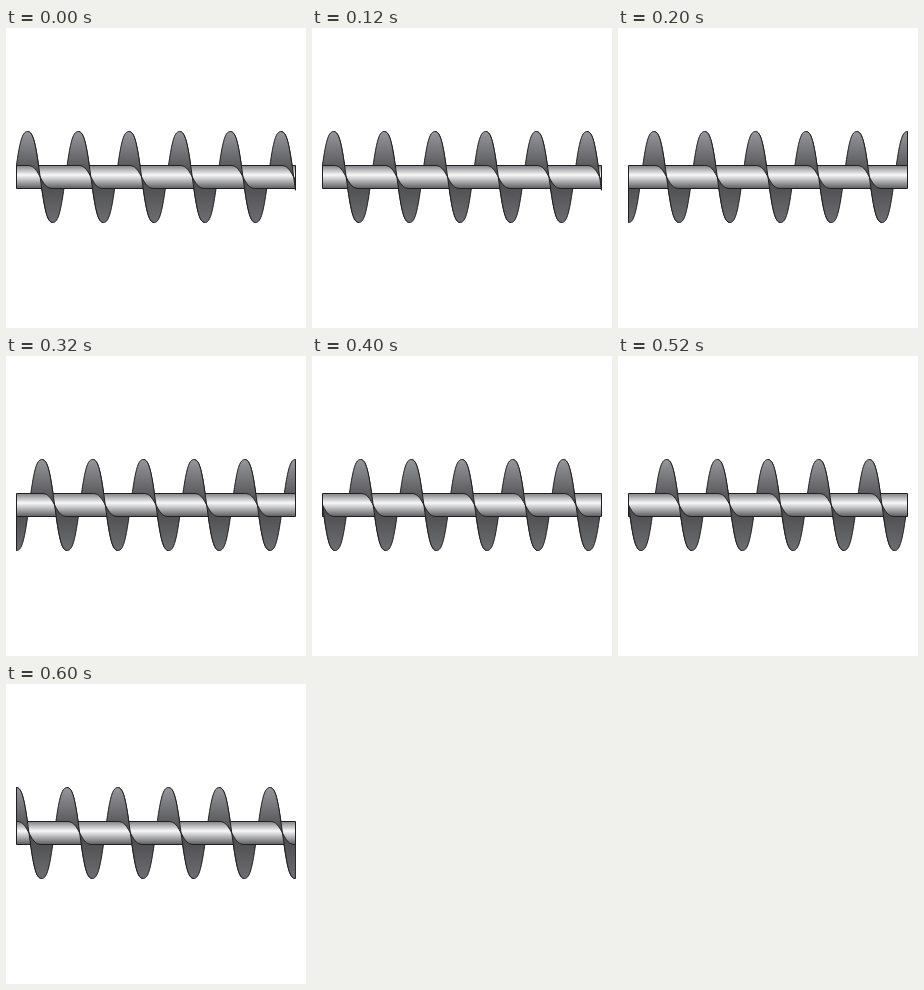
Animation of 300x300 px, one loop 800 ms. Source, as an HTML page:

```html
<!DOCTYPE html>
<html lang="en">
<head>
<meta charset="utf-8">
<title>Rotating screw</title>
<style>
  html, body { margin: 0; width: 100%; height: 100%; overflow: hidden; background: #fff; }
  svg { display: block; width: 100%; height: 100%; }
  .line { stroke: #231f20; stroke-width: 1; stroke-linejoin: round; }
  .blade { fill: url(#bladeTone); }
</style>
</head>
<body>
<svg viewBox="0 0 300 300">
  <defs>
    <linearGradient id="bladeTone" gradientUnits="userSpaceOnUse" x1="0" y1="103" x2="0" y2="195">
      <stop offset="0" stop-color="#97989c"/>
      <stop offset=".5" stop-color="#48484a"/>
      <stop offset="1" stop-color="#6d6e71"/>
    </linearGradient>
    <linearGradient id="shaftTone" x1="0" y1="0" x2="0" y2="1">
      <stop offset="0" stop-color="#808185"/>
      <stop offset=".41" stop-color="#f8f8f9"/>
      <stop offset="1" stop-color="#5c5d60"/>
    </linearGradient>
  </defs>
  <path id="back" class="blade line"/>
  <rect class="line" x="10.5" y="137.5" width="279" height="23" fill="url(#shaftTone)"/>
  <path id="front" class="blade"/>
  <path id="edges" class="line" fill="none"/>
</svg>
<script>
const LEFT = 10.5, RIGHT = 289.5, MID = 149;
const OUTER = 45.5, INNER = 11.5, PITCH = 50.7;
const ROUND = 0.07; // third harmonic that broadens the crests
const FIRST_PEAK = 21.5;
const SHIFTS = [0, 14.4, 27, 39.5];
const STEP = 200;

const back = document.getElementById('back');
const front = document.getElementById('front');
const edges = document.getElementById('edges');

function profile(angle) {
  return (Math.cos(angle) - ROUND * Math.cos(3 * angle)) / (1 - ROUND);
}

function wave(from, to, radius, peak) {
  const count = Math.max(2, Math.ceil(Math.abs(to - from)));
  const points = [];
  for (let i = 0; i <= count; i++) {
    const x = from + (to - from) * i / count;
    const y = MID - radius * profile(2 * Math.PI * (x - peak) / PITCH);
    points.push(x.toFixed(2) + ' ' + y.toFixed(2));
  }
  return points.join('L');
}

function draw(shift) {
  const peak = FIRST_PEAK + shift;
  back.setAttribute('d',
    `M${LEFT} ${MID}L${wave(LEFT, RIGHT, OUTER, peak)}L${RIGHT} ${MID}Z`);

  let fill = '', lines = '';
  // The half turn from each crest to the next trough passes in front of the shaft.
  for (let start = peak - 2 * PITCH; start < RIGHT; start += PITCH) {
    const a = Math.max(LEFT, start);
    const b = Math.min(RIGHT, start + PITCH / 2);
    if (b <= a) continue;
    const outer = wave(a, b, OUTER, peak);
    const inner = wave(b, a, INNER, peak);
    fill += `M${outer}L${inner}Z`;
    lines += `M${outer}${b === RIGHT ? 'L' : 'M'}${inner}`;
    if (a === LEFT) lines += 'L' + outer.split('L')[0];
  }
  front.setAttribute('d', fill);
  edges.setAttribute('d', lines);
}

let shown = -1;
function tick() {
  const step = Math.floor(performance.now() / STEP) % SHIFTS.length;
  if (step !== shown) draw(SHIFTS[shown = step]);
  requestAnimationFrame(tick);
}
tick();
</script>
</body>
</html>
```
